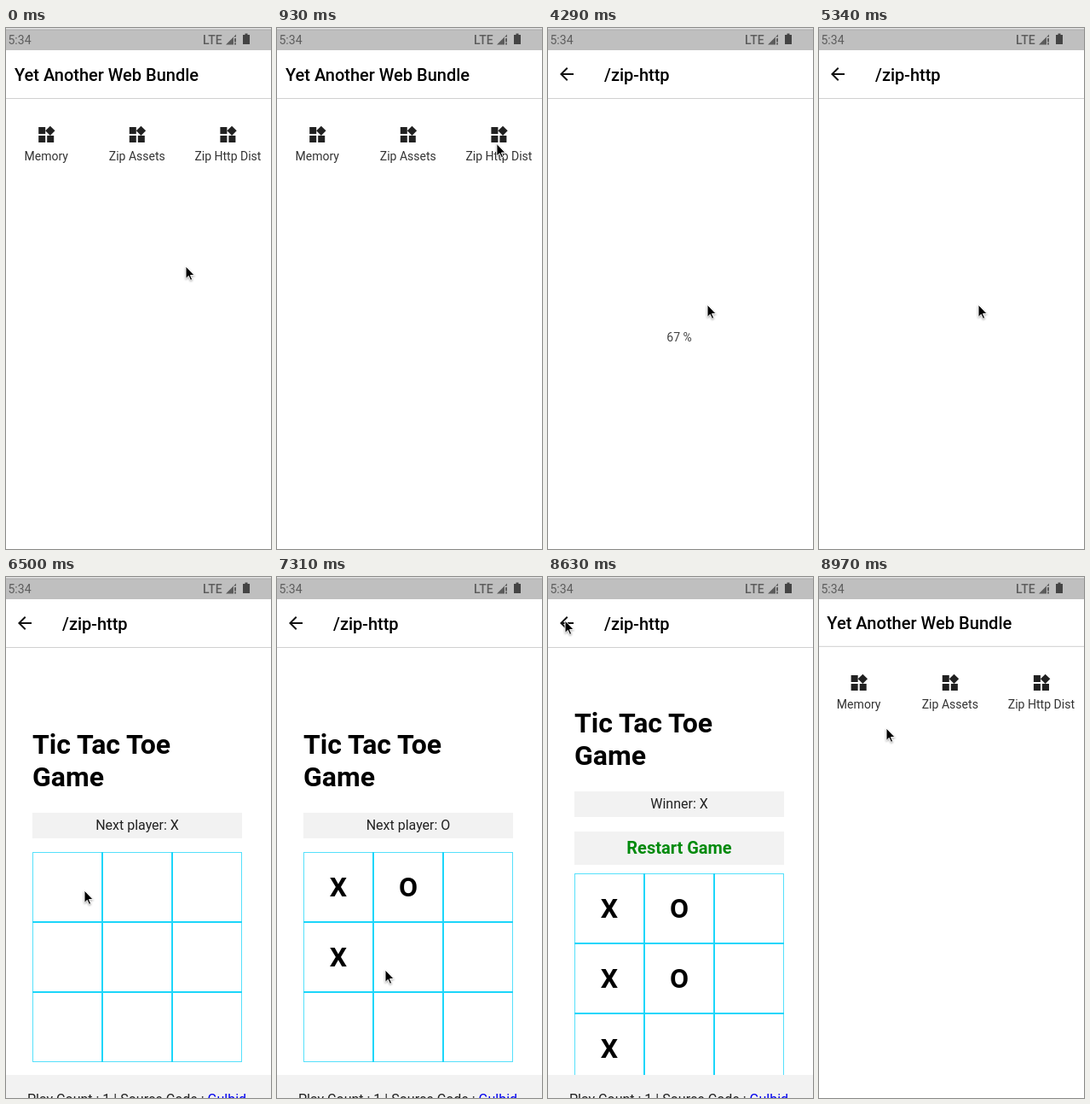
Recreate the animation shown at these times as an HTML page. Size 311 by 610 pixels, loop 9.06 s.

```html
<!DOCTYPE html>
<html lang="en">
<head>
<meta charset="utf-8">
<title>Web bundle demo</title>
<style>
  html, body { margin: 0; width: 100%; height: 100%; overflow: hidden; background: #fff; }
  svg { display: block; width: 311px; height: 610px; font: 14px Roboto, sans-serif; fill: #333; }
  .title { font-size: 20px; font-weight: 500; fill: #000; }
  .mid { text-anchor: middle; }
  .label { font-size: 16px; fill: #222; }
  .heading, .mark { font-size: 32px; font-weight: 700; fill: #000; }
  .restart { font-size: 20px; font-weight: 700; fill: #008a0c; }
  .status { fill: #5c5c5c; }
  .panel { fill: #f2f2f2; }
  .grid { fill: none; stroke: #1cd6fa; }
</style>
</head>
<body>
<svg viewBox="0 0 311 610">
  <defs>
    <clipPath id="screen"><rect y="2" width="311" height="608"/></clipPath>
    <path id="widgets" fill="#212121" d="M13 13v8h8v-8zM3 21h8v-8H3zM3 3v8h8V3zM16.66 1.69 11 7.34 16.66 13l5.66-5.66z"/>
  </defs>
  <g clip-path="url(#screen)">
    <g id="home">
      <rect x="-6" y="2" width="320" height="636" fill="#fff"/>
      <text class="title" x="10" y="62">Yet Another Web Bundle</text>
      <rect x="-6" y="82" width="320" height="1" fill="#d0d0d0"/>
      <g id="tiles"></g>
    </g>
    <rect id="scrim" width="311" height="610"/>
    <g id="detail">
      <rect x="-6" y="2" width="320" height="636" fill="#fff"/>
      <path fill="#111" transform="translate(10 42)" d="M20 11H7.83l5.59-5.59L12 4l-8 8 8 8 1.41-1.41L7.83 13H20z"/>
      <text class="title" x="66" y="62">/zip-http</text>
      <rect x="-6" y="82" width="320" height="1" fill="#d0d0d0"/>
      <text id="percent" class="mid" x="154" y="367" fill="#444"></text>
      <g id="game">
        <g id="top">
          <text class="heading" x="31" y="206.500">Tic Tac Toe</text>
          <text class="heading" x="31" y="244.500">Game</text>
          <rect class="panel" x="31" y="276" width="246" height="30"/>
          <text id="turn" class="label mid" x="154" y="296"></text>
        </g>
        <g id="restart">
          <rect class="panel" x="31" y="298" width="246" height="39"/>
          <text class="restart mid" x="154" y="324">Restart Game</text>
        </g>
        <g id="board">
          <rect class="grid" x="31.500" y="322.500" width="245" height="245" opacity=".75"/>
          <path class="grid" stroke-width="2" d="M113 322v246m82 0v-246M31 404h246m0 82h-246"/>
        </g>
        <rect class="panel" x="-6" y="583" width="320" height="55"/>
        <text class="label" x="25" y="617">Play Count : 1 | Source Code : <tspan fill="#00e" text-decoration="underline">Gulbid</tspan></text>
      </g>
    </g>
    <rect y="2" width="311" height="24" opacity=".25" fill="#000"/>
  </g>
  <rect width="311" height="2" fill="#e4e4e4"/>
  <rect y="1.500" width="311" height="1" fill="#aaa"/>
  <text class="status" x="2.500" y="19">5:34</text>
  <text class="status" x="231" y="19" font-weight="500">LTE</text>
  <path fill="#5c5c5c" d="M258 19.500 270 7.500v3h-3v9zM268 12h2v4.500h-2zM268 17.500h2v2h-2z"/>
  <path fill="#444" d="M278 8h2.500V6.500h3V8h2.500v11h-8z"/>
  <path id="cursor" stroke="#fff" fill="#000" style="filter:drop-shadow(0 1px 1px #0005)"
    d="M0 0V14.500l3.300-3.100 2.200 5 2.200-1-2.200-4.800h4.700z"/>
</svg>
<script>
const LOOP = 9060, TICK = 88.5;

// Pointer glides; a glide with a cell ends in a click on that cell
const REST = { x: 211, y: 279 };
const GLIDES = [
  { at: 330, steps: 8, x: 260, y: 129 },
  { at: 1290, steps: 8, x: 187, y: 324 },
  { at: 6150, steps: 5, x: 92, y: 367, cell: 0 },
  { at: 6770, steps: 2, x: 146, y: 372, cell: 1 },
  { at: 7036, steps: 2, x: 84, y: 448, cell: 3 },
  { at: 7213, steps: 2, x: 127, y: 460, cell: 4 },
  { at: 7480, steps: 3, x: 81, y: 513, cell: 6 },
  { at: 7840, steps: 10, x: 20, y: 51 },
  { at: 8890, steps: 2, x: 79, y: 177 },
];
const CLICKS = GLIDES.filter(glide => "cell" in glide);

const el = id => document.getElementById(id);
const show = (node, on) => node.setAttribute("visibility", on ? "inherit" : "hidden");
const shift = (node, x, y) => node.setAttribute("transform", `translate(${x} ${y})`);
const zoom = (node, s) => node.setAttribute("transform", `translate(154 320) scale(${s}) translate(-154 -320)`);
const fade = (node, alpha) => node.setAttribute("opacity", alpha);
const smooth = p => p * p * (3 - 2 * p);
const easeOut = p => 1 - (1 - p) ** 2;

// Progress 0..1 in equal ticks; the first step falls on `at`
function stepped(t, at, steps) {
  const done = Math.floor((t - at) / TICK + .1) + 1;
  return Math.max(0, Math.min(steps, done)) / steps;
}

el("tiles").innerHTML = ["Memory", "Zip Assets", "Zip Http Dist"].map((name, i) => {
  const x = 47.2 + i * 106.6;
  return `<use href="#widgets" x="${x - 12}" y="113"/><text class="mid" x="${x}" y="155">${name}</text>`;
}).join("");

el("board").innerHTML += Array.from({ length: 9 }, (_, i) =>
  `<text class="mark mid" x="${72 + i % 3 * 82}" y="${373.5 + Math.floor(i / 3) * 82}"></text>`).join("");
const marks = document.querySelectorAll(".mark");

function drawPages(t) {
  // The push stalls just short of its end while the page loads
  const push = .917 * easeOut(stepped(t, 1645, 5)) + .083 * stepped(t, 2890, 1);
  const pop = .9 * stepped(t, 8890, 2);
  zoom(el("detail"), .85 + .15 * push - .1 * pop);
  fade(el("detail"), pop ? Math.max(0, 1 - 1.4 * pop) : Math.min(1, 2 * push));
  zoom(el("home"), 1 + .05 * (push - pop));
  fade(el("scrim"), pop ? 0 : .65 * push);

  const percent = 64 * stepped(t, 2890, 7) + 35 * stepped(t, 4290, 12);
  el("percent").textContent = t < 5340 ? `${Math.round(percent)} %` : "";
}

function drawGame(t) {
  const played = CLICKS.filter(({ at, steps }) => stepped(t, at + steps * TICK, 1));
  const won = played.length === CLICKS.length;
  marks.forEach((mark, cell) => {
    const turn = played.findIndex(click => click.cell === cell);
    mark.textContent = turn < 0 ? "" : "XO"[turn % 2];
  });
  el("turn").textContent = won ? "Winner: X" : `Next player: ${"XO"[played.length % 2]}`;
  shift(el("top"), 0, won ? -25 : 0);
  shift(el("board"), 0, won ? 25 : 0);
  show(el("restart"), won);
  show(el("game"), t >= 5880);
}

function drawCursor(t) {
  let { x, y } = REST;
  for (const glide of GLIDES) {
    const p = smooth(stepped(t, glide.at, glide.steps));
    x += (glide.x - x) * p;
    y += (glide.y - y) * p;
  }
  shift(el("cursor"), x, y);
}

const begin = performance.now();
(function frame() {
  const t = (performance.now() - begin) % LOOP;
  drawPages(t);
  drawGame(t);
  drawCursor(t);
  requestAnimationFrame(frame);
})();
</script>
</body>
</html>
```
